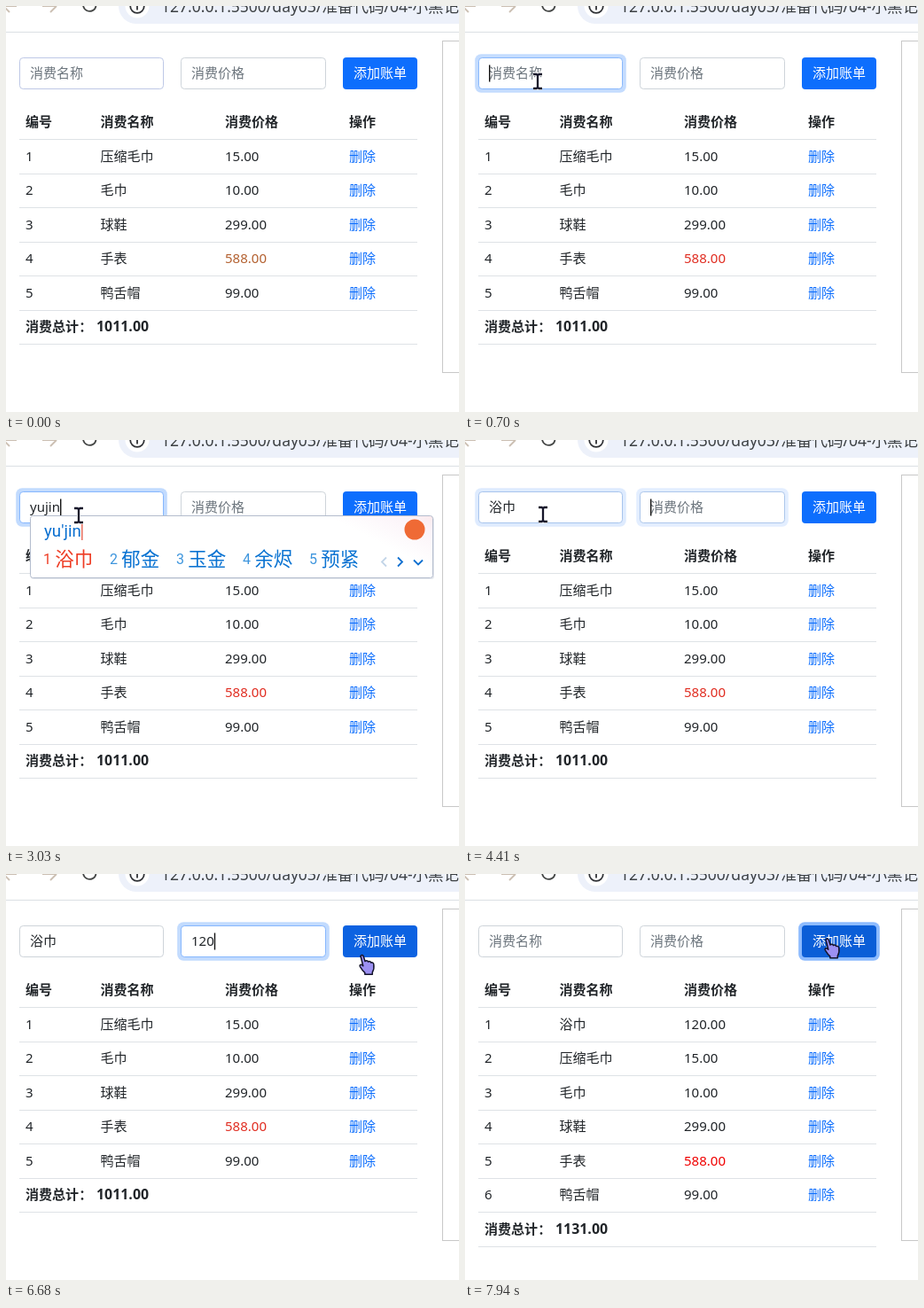
An HTML page that plays this animation: 511x458 px, repeating every 8 s.

```html
<!DOCTYPE html>
<html lang="zh-CN">
<head>
<meta charset="utf-8">
<title>消费账单</title>
<style>
html, body { margin: 0; width: 100%; height: 100%; overflow: hidden; background: #fff; }
svg { display: block; font: 15.04px "Noto Sans", "Noto Sans CJK SC", "Noto Sans CJK", sans-serif; fill: #212529; }
.head { font-weight: 700; }
.sum { font-size: 15.9px; }
.link { fill: #0d6efd; }
.hint { fill: #6c757d; }
.line { stroke: #dee2e6; }
.url { font-size: 17.5px; fill: #3c4043; }
.pinyin { font: 18.7px Roboto, sans-serif; fill: #0a6fd0; }
.num { font: 16px Roboto, sans-serif; fill: #3d95dd; }
.word { font-size: 21.5px; fill: #0a73d2; }
.first { fill: #ee3c24; }
.stroke { fill: none; stroke-width: 1.8; }
</style>
</head>
<body>
<svg width="511" height="458" viewBox="0 0 511 458">
  <defs>
    <linearGradient id="blush" x1="0" x2="1" y1="0.3" y2="0">
      <stop offset="0.76" stop-color="#fff"/>
      <stop offset="0.93" stop-color="#fbf3f8"/>
      <stop offset="1" stop-color="#fbe9ec"/>
    </linearGradient>
  </defs>
  <rect width="511" height="458" fill="#fff"/>
  <rect x="127" y="-20" width="420" height="40" rx="20" fill="#edf1fa"/>
  <circle cx="148" cy="0" r="13.5" fill="#fff"/>
  <g class="stroke">
    <path d="M-4 0H12M-3 0L4 7M41 0H57M50 7L57 0" stroke="#cbbfb2"/>
    <path d="M101.5 0A7.3 7.3 0 1 1 100 -6" stroke="#454746"/>
    <path d="M148 -1V4.5" stroke="#303236"/>
    <circle cx="148" cy="0" r="7.8" stroke="#303236"/>
  </g>
  <text class="url" x="175" y="7">127.0.0.1:5500/day03/准备代码/04-小黑记</text>
  <path d="M0 29.5H511" stroke="#dcdfe4"/>
  <rect x="492.5" y="39.5" width="60" height="374" fill="none" stroke="#c8c8c8"/>
  <g id="table"></g>
  <g id="fields"></g>
  <rect id="buttonRing" x="376.2" y="54.2" width="91.6" height="43.6" rx="7" fill="#3184fd"/>
  <rect id="button" x="380" y="58" width="84" height="36" rx="4"/>
  <text x="422" y="81" text-anchor="middle" fill="#fff">添加账单</text>
  <rect id="caret" y="66.5" width="1.4" height="19" fill="#111"/>
  <g id="popup"></g>
  <g id="beam" fill="none">
    <path d="M-5 -8H-1.5L0 -7L1.5 -8H5M0 -7V7M-5 8H-1.5L0 7L1.5 8H5" stroke="#fff" stroke-width="4"/>
    <path d="M-5 -8H-1.5L0 -7L1.5 -8H5M0 -7V7M-5 8H-1.5L0 7L1.5 8H5" stroke="#16162a" stroke-width="2.3"/>
  </g>
  <path id="hand" fill="#9c90f2" stroke="#14142a" stroke-width="1.5" stroke-linejoin="round"
    d="M-6-10c1-2 3-1 3.5 1l1.5 5c1-1 3-1 3.5.5c1.5-.8 3-.3 3.3 1c1.5-.5 2.8.3 3 1.8c.5 3 .3 6-1.5 9v2.5h-8.5v-2c-2.5-2-4-4.5-5.5-7c-.8-1.5 1-2.8 2.5-1.5l1 1z"/>
</svg>
<script>
const LOOP = 8000, BLINK = 530, FADE = 150;
const FOCUS_NAME = 570, FOCUS_PRICE = 4340, HOVER = 6580, PRESS = 6990, ADDED = 7250;
const ROW_HEIGHT = 38.5;
const COLUMNS = [22, 106.5, 247, 387];
const $ = id => document.getElementById(id);

const goods = [['压缩毛巾', 15], ['毛巾', 10], ['球鞋', 299], ['手表', 588], ['鸭舌帽', 99]];
const withTowel = [['浴巾', 120], ...goods];

const nameSteps = [[0, ''], [1470, 'y'], [1590, 'yu'], [1840, 'yuj'], [1970, 'yuji'],
  [2090, 'yujing'], [3030, 'yujin'], [3210, '浴巾'], [ADDED, '']];
const priceSteps = [[0, ''], [5290, '1'], [5470, '12'], [5600, '120'], [ADDED, '']];
const candidates = {
  y: '有 一个 已经 要求 因为',
  yu: '与 预计 语言 于是 遇到',
  yuj: '遇见 预计 语句 雨季 渔具',
  yuji: '预计 雨季 淤积 预急 雨霁',
  yujing: '预警 御景 语境 狱警 雨景',
  yujin: '浴巾 郁金 玉金 余烬 预紧',
};
const caretResets = [620, 1470, 1590, 1840, 1970, 2090, 3030, 3210, 4380, 5290, 5470, 5600];
const pointer = [[60, 360, 365], [520, 82, 85], [3720, 82, 85], [3770, 88, 84], [6140, 88, 84],
  [6640, 406, 102.5], [6690, 406, 102.5], [6930, 413, 85], [7900, 413, 85], [7940, 413, 84]];

const smooth = p => p * p * (3 - 2 * p);
const fade = (t, start) => smooth(Math.min(1, Math.max(0, (t - start) / FADE)));
const mix = (a, b, p) => `rgb(${a.map((v, i) => Math.round(v + (b[i] - v) * p))})`;
const latest = (steps, t) => steps.filter(s => s[0] <= t).pop()[1];
const show = (el, on) => el.setAttribute('visibility', on ? 'visible' : 'hidden');
const text = (x, y, str, cls = '', extra = '') => `<text x="${x}" y="${y}" class="${cls}" ${extra}>${str}</text>`;

const cache = {};
function fill(id, key, build) {
  if (cache[id] === key) return;
  cache[id] = key;
  $(id).innerHTML = build();
}

function makeField(x, width, hint) {
  const g = document.createElementNS('http://www.w3.org/2000/svg', 'g');
  g.innerHTML = `<rect x="${x - 3.8}" y="54.2" width="${width + 7.6}" height="43.6" rx="7" fill="#c2dbfe"/>
    <rect x="${x + .5}" y="58.5" width="${width - 1}" height="35" rx="3.8" fill="#fff"/>${text(x + 12, 81, '')}`;
  $('fields').append(g);
  const [ring, box, label] = g.children;
  return {
    draw(value, focus, rest = [206, 212, 218]) {
      ring.setAttribute('opacity', focus);
      box.setAttribute('stroke', mix(rest, [134, 183, 254], focus));
      label.textContent = value || hint;
      label.setAttribute('class', value ? '' : 'hint');
    },
    caretX: value => x + 12 + (value ? label.getComputedTextLength() : 0),
  };
}
const nameField = makeField(15, 163, '消费名称');
const priceField = makeField(197, 164, '消费价格');

function buildTable(rows, red) {
  const baseline = i => Math.round(174.8 + ROW_HEIGHT * i);
  const line = i => `<path class="line" d="M15 ${Math.round(150.3 + ROW_HEIGHT * i) + .5}H464"/>`;
  const heads = ['编号', '消费名称', '消费价格', '操作'];
  const total = rows.reduce((sum, row) => sum + row[1], 0);
  const totalY = baseline(rows.length);
  return heads.map((h, i) => text(COLUMNS[i], 136, h, 'head')).join('') + line(0) +
    rows.map(([name, price], i) => {
      const y = baseline(i);
      const tint = price > 500 ? `style="fill:${red}"` : '';
      return text(COLUMNS[0], y, i + 1) + text(COLUMNS[1], y, name) +
        text(COLUMNS[2], y, price.toFixed(2), '', tint) + text(COLUMNS[3], y, '删除', 'link') + line(i + 1);
    }).join('') +
    text(22, totalY, '消费总计：', 'head') + text(102, totalY, total.toFixed(2), 'head sum') + line(rows.length + 1);
}

function buildPopup(typed) {
  if (!candidates[typed]) return '';
  let x = 42;
  const words = candidates[typed].split(' ').map((word, i) => {
    const cls = i ? '' : ' first';
    const item = text(x, 139.5, i + 1, 'num' + cls) + text(x + 13.3, 142, word, 'word' + cls);
    x += 32 + 21.5 * word.length;
    return item;
  }).join('');
  const right = x + 65;
  const pinyin = typed.replace(/^yu(?=.)/, "yu'");
  return `<rect x="28" y="87" width="${right - 27}" height="70" rx="3" fill="#8090b0" opacity=".2"/>
    <rect x="27.5" y="85.5" width="${right - 28}" height="70" rx="3" fill="url(#blush)" stroke="#b3bccd"/>
    ${text(43, 108.5, pinyin, 'pinyin')}
    <rect id="pinyinCaret" y="91" width="1.2" height="22" fill="#e34a35"/>${words}
    <circle cx="${right - 21}" cy="101" r="11.5" fill="#ef6a35"/>
    <g class="stroke" transform="translate(${right - 482} -.5)">
      <path d="M429 133L424 138L429 143" stroke="#c3d5e8"/>
      <path d="M442 133L447 138L442 143M460 136L465 141L470 136" stroke="#0a6fd0"/>
    </g>`;
}

function pointerAt(t) {
  const i = pointer.findIndex(p => p[0] > t);
  if (i < 1) return pointer[i < 0 ? pointer.length - 1 : 0].slice(1);
  const [t0, x0, y0] = pointer[i - 1], [t1, x1, y1] = pointer[i];
  const p = smooth((t - t0) / (t1 - t0));
  return [x0 + (x1 - x0) * p, y0 + (y1 - y0) * p];
}

function render(t) {
  const name = latest(nameSteps, t), price = latest(priceSteps, t);
  const red = t < 60 ? '#b3602f' : t < ADDED ? '#e02c20' : '#f00000';
  fill('table', red, () => buildTable(t < ADDED ? goods : withTowel, red));

  nameField.draw(name, fade(t, FOCUS_NAME) - fade(t, FOCUS_PRICE), t < FOCUS_NAME ? [190, 200, 230] : undefined);
  priceField.draw(price, fade(t, FOCUS_PRICE) - fade(t, PRESS));
  $('button').setAttribute('fill', mix([13, 110, 253], [11, 94, 215], fade(t, HOVER)));
  $('buttonRing').setAttribute('opacity', fade(t, PRESS) * .55);

  const reset = caretResets.filter(r => r <= t).pop();
  const lit = reset !== undefined && t < PRESS && Math.floor((t - reset) / BLINK) % 2 === 0;
  show($('caret'), lit);
  $('caret').setAttribute('x', t < FOCUS_PRICE ? nameField.caretX(name) : priceField.caretX(price));

  fill('popup', name, () => buildPopup(name));
  if ($('pinyinCaret')) {
    $('pinyinCaret').setAttribute('x', 43.5 + document.querySelector('.pinyin').getComputedTextLength());
  }

  const [x, y] = pointerAt(t);
  for (const id of ['beam', 'hand']) {
    $(id).setAttribute('transform', `translate(${x.toFixed(2)} ${y.toFixed(2)})`);
    show($(id), t >= 60 && (id === 'hand') === (t >= HOVER));
  }
}

const start = performance.now();
function tick() {
  render((performance.now() - start) % LOOP);
  requestAnimationFrame(tick);
}
tick();
</script>
</body>
</html>
```
